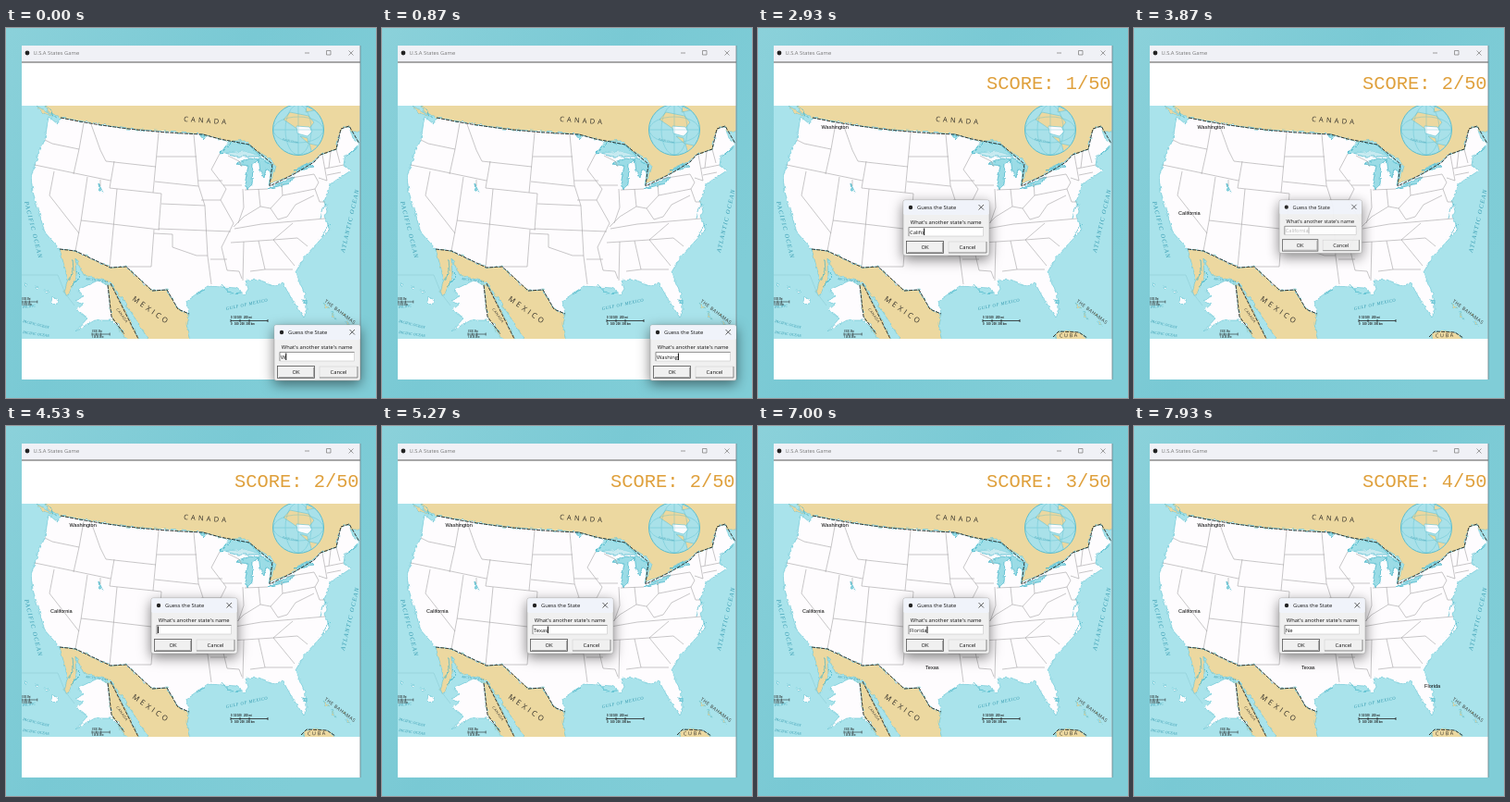
Write an HTML page that moves like this. It is 400 by 400 pixels and loops after 8000 ms.

```html
<!DOCTYPE html>
<html lang="en">
<head>
<meta charset="utf-8">
<title>States game</title>
<style>
  html, body { margin: 0; width: 100%; height: 100%; overflow: hidden; background: #7fccd6; }
  svg { display: block; width: 100vw; height: 100vh; }
  text { white-space: pre; }
  .ui { font: 5.8px "Open Sans", "Noto Sans", sans-serif; fill: #111; }
  .land { fill: #ecd8a0; stroke: #5cbfd0; stroke-width: .5; }
  .white { fill: #fefcfe; stroke: #62c3d2; stroke-width: .6; stroke-linejoin: round; }
  .lake { fill: #9bdce6; stroke: #42b3c7; stroke-width: .7; stroke-linejoin: round; }
  .borders { fill: none; stroke: #a3a1a3; stroke-width: .6; stroke-linejoin: round; }
  .frontier { fill: none; stroke: #282622; stroke-width: .9; stroke-dasharray: 4 1.2; }
  .coast { fill: none; stroke: #44b5c8; stroke-width: .7; }
  .country { font-family: "Open Sans", sans-serif; fill: #33302a; }
  .sea { font-family: "Liberation Serif", serif; font-style: italic; fill: #3198ae; }
  .scale { font: bold 2.8px "Liberation Sans", sans-serif; fill: #222; }
  #labels { font: 5.6px "Liberation Sans", Arial, sans-serif; }
  #score { font: 20.4px "Liberation Mono", "Courier New", monospace; fill: #dfa03c; }
  #dialog { filter: drop-shadow(0 4px 7px rgba(0, 0, 0, .5)); }
</style>
</head>
<body>
<svg viewBox="0 0 400 400">
  <defs>
    <linearGradient id="desk" x2="1" y2=".6">
      <stop stop-color="#8bd1da"/><stop offset=".5" stop-color="#79c9d4"/><stop offset="1" stop-color="#80cdd7"/>
    </linearGradient>
    <clipPath id="mapArea"><rect x="17" y="84" width="365.5" height="252"/></clipPath>
    <clipPath id="globeArea"><circle cx="316" cy="110" r="27"/></clipPath>
    <!-- Roughens the simplified coastlines -->
    <filter id="rough" color-interpolation-filters="sRGB" x="0" y="0" width="1" height="1">
      <feTurbulence type="fractalNoise" baseFrequency=".2" numOctaves="2" seed="4"/>
      <feDisplacementMap in="SourceGraphic" scale="4" xChannelSelector="R" yChannelSelector="G"/>
    </filter>
    <g id="ruler">
      <path d="M0 0H40M0-1.5v3m10-3v3m10-3v3m20-3v3" stroke="#222" stroke-width=".8"/>
      <text class="scale" y="-2.3">0  50 100   200 mi</text>
      <text class="scale" y="4.4">0   100  200  300 km</text>
    </g>
  </defs>

  <rect width="400" height="400" fill="url(#desk)"/>
  <rect x="17" y="19" width="366" height="361" fill="#fff"/>
  <rect x="17" y="19" width="366" height="17.5" fill="#f0f1f6"/>
  <path d="M17 37H383" stroke="#555" stroke-width="1.2"/>
  <circle cx="23" cy="27" r="2.4" fill="#222"/>
  <text class="ui" x="29.5" y="29.2" style="fill:#777">U.S.A States Game</text>
  <path d="M323 27h5M346.5 24.5h4.5v4.5h-4.5zM370.5 24.5l5 5m0-5l-5 5" fill="none" stroke="#777" stroke-width=".7"/>

  <g clip-path="url(#mapArea)">
    <rect x="17" y="84" width="366" height="252" fill="#a9e3eb"/>

    <g filter="url(#rough)">
      <rect x="10" y="75" width="380" height="270" fill="#a9e3eb"/>
      <!-- Canada and Mexico -->
      <path class="land" d="M39 80L45 90 59 97 130 109 213 115 240 123 258 121 270 132 285 141 291 149 285 170 313 158 315 151 334 144 341 137 356 132 363 109 376 112 390 112V78Z"/>
      <path class="land" d="M33 84L48 93 54 97 39 91Z"/>
      <path class="land" d="M58 239L75 241 113 259 130 258 158 284 174 283 186 304 198 309 195 320 199 340H156L132 302 113 275 84 267 75 249 76 270 66 291 63 285 67 272Z"/>
      <!-- Contiguous states -->
      <path class="white" d="M46 96L56 104 59 97 130 109 213 115 231 120 241 123 231 136 258 133 278 139 286 156 284 170 313 157 333 145 340 137 357 131 362 109 371 106 375 119 382 125 366 141 365 149 373 154 350 169 344 188 347 198 344 203 350 218 323 247 313 264 324 291 325 304 322 313 309 293 299 275 291 279 273 272 259 273 262 282 258 288 249 281 218 279 195 295 198 309 186 304 174 283 158 284 130 258 113 259 75 241 58 239 42 221 29 177 27 161 35 136 42 121Z"/>
      <!-- Great Lakes and smaller water -->
      <path class="lake" d="M232 135L245 122 263 127 276 139 249 139Z" fill-opacity=".55"/>
      <path class="lake" d="M249 147L264 141 273 143 267 147 266 169 261 175 258 169 262 149Z"/>
      <path class="lake" d="M273 140L289 149 287 156 281 152 279 162 275 156Z"/>
      <path class="lake" d="M282 174L291 170 312 160 307 168ZM311 154L328 147 332 150Z"/>
      <path class="lake" d="M100 168l5 10-4-3zM209 115l7 1-2 5zM321 293l4 1v4l-4-1z"/>
      <path class="coast" d="M42 84l6 3 3 9M347 190l-4 5-3 11m10 5l-9 15M365 140l7-5 9-7M205 287l10-4m18-6l9 10 12-1"/>
      <path class="coast" d="M72 249l1 13-5 11M76 263l5 5-11 11"/>
      <!-- Alaska and Hawaii -->
      <path class="land" d="M108 276L116 280 146 340H133L113 313Z"/>
      <path class="white" d="M78 283L99 273 110 278 114 312 128 330 114 316 96 316 76 327 88 314 76 305 83 299 75 294 84 290Z"/>
      <path class="white" d="M20 276l3 1-2 2zM31 279l4 1-3 2zM41 284l5 1-3 2zM50 291l7 4-4 5-4-4z"/>
      <!-- Caribbean -->
      <path class="land" d="M319 340L324 329 336 327 347 329 360 340ZM343 297l8 6-5-1zM352 306l5 9-4-3zM364 307l4 5-3-1zM368 317l5 4-5-1z"/>
    </g>

    <!-- State lines, west to east -->
    <path class="borders" d="M42 121L50 125 79 131M84 103L79 131 73 158M31 148L113 165M52 155L47 181 79 222M88 161L81 209 75 241M92 104L102 132 108 144 162 150M117 144L112 173 159 178M165 113L159 178M102 164v7M120 174L112 259M81 208L166 218"/>
    <path class="borders" d="M163 139H206M203 115L208 170 215 192 218 247 222 277M161 166L208 171M159 178L168 179 165 218M168 190L215 192M165 217L243 220M160 218L157 258H130M160 222L180 223V237L206 246H218"/>
    <path class="borders" d="M208 165H234M211 186H232M231 136L222 153 238 174 232 186 246 211 233 237 239 262 252 263 255 271M221 250H239M235 170H255M240 138L252 144 255 150M256 174L257 194 251 211M258 175L283 174M273 174L275 193"/>
    <path class="borders" d="M246 215L257 204 275 193 286 195 299 181M247 217L276 212 345 206M243 232L289 229 315 227 326 236M257 231L256 273M273 230L280 261H310M264 263L280 261M289 229L312 257M289 229L310 211"/>
    <path class="borders" d="M298 168L299 181 334 174 338 167 333 158 302 163M286 195L294 207 304 204 313 191 333 181M334 174L339 188H345M338 162L347 165 342 137M345 152L365 148M351 134L349 151M357 131L361 146M347 159L362 156"/>
    <path class="frontier" d="M59 97Q130 112 213 115L231 120 263 126 288 147 285 171 313 157 333 145 340 137 357 131 362 109 371 106 382 125"/>
    <path class="frontier" d="M58 239L75 241 113 259 130 258 158 284 174 283 186 304 198 309"/>
    <path class="frontier" d="M110 278L114 312 128 331M113 276L143 336M319 334l6-6 22 1 9 6" stroke-width=".6"/>
    <path class="borders" d="M17 267H56L64 287 74 300" style="stroke:#8dcbd6"/>

    <!-- Globe -->
    <circle cx="316" cy="110" r="27.5" fill="#a9e1e9" stroke="#5abccd"/>
    <g clip-path="url(#globeArea)">
      <path class="land" d="M300 99L307 91 327 95 333 102 323 115 309 105ZM318 117l8 2 1 6zM325 85l8 4-9 2zM328 125l9 2-6 9z"/>
      <path class="white" d="M314 106L328 107 331 112 326 117 315 114Z"/>
      <g class="coast" opacity=".45">
        <path d="M289 110h54M316 83v54"/>
        <ellipse cx="316" cy="110" rx="14" ry="27"/>
        <ellipse cx="316" cy="110" rx="27" ry="14"/>
      </g>
    </g>
    <text class="sea" font-size="3" transform="translate(299 121) rotate(12)">Pacific Ocean</text>

    <text class="country" font-size="7.6" letter-spacing="3.1" transform="translate(192 101) rotate(4)">CANADA</text>
    <text class="country" font-size="8" letter-spacing="3" transform="translate(136 294) rotate(35)">MEXICO</text>
    <text class="country" font-size="3.8" letter-spacing=".6" transform="translate(119 304) rotate(54)">CANADA</text>
    <text class="country" font-size="5" letter-spacing=".6" transform="translate(344 296) rotate(37)">THE BAHAMAS</text>
    <text class="country" font-size="5.5" letter-spacing="1.6" transform="translate(326 334.5) rotate(-2)">CUBA</text>
    <text class="sea" font-size="6.5" letter-spacing="1.3" transform="translate(20 188) rotate(76)">PACIFIC OCEAN</text>
    <text class="sea" font-size="6.5" letter-spacing="1.3" transform="translate(366 243) rotate(-77)">ATLANTIC OCEAN</text>
    <text class="sea" font-size="4.8" letter-spacing=".5" transform="translate(238 305) rotate(-12)">GULF OF MEXICO</text>
    <text class="sea" font-size="3.5" transform="translate(86 272) rotate(8)">ARCTIC OCEAN</text>
    <text class="sea" font-size="3.8" transform="translate(18 303) rotate(-7)">PACIFIC</text>
    <text class="sea" font-size="4" transform="translate(18 318) rotate(14)">PACIFIC OCEAN</text>
    <text class="sea" font-size="4" transform="translate(18 330) rotate(8)">PACIFIC OCEAN</text>
    <use href="#ruler" x="243" y="316.5"/>
    <use href="#ruler" transform="translate(93 331) scale(.48 1)"/>
    <use href="#ruler" transform="translate(17 296) scale(.42 1)"/>
  </g>
  <path d="M383 19V380" stroke="#697d83" stroke-width=".8"/>

  <g id="labels"></g>
  <text id="score" x="247" y="66"></text>

  <g id="dialog">
    <rect width="93" height="60" rx="2" fill="#f0f0f0" stroke="#999" stroke-width=".5"/>
    <rect x=".3" y=".3" width="92.4" height="15.7" rx="1.7" fill="#f0f3fa"/>
    <circle cx="8" cy="8" r="2.2" fill="#222"/>
    <text class="ui" x="15" y="10.2">Guess the State</text>
    <path d="M81.5 5l5.5 5.5m0-5.5l-5.5 5.5" stroke="#222" stroke-width=".7"/>
    <text class="ui" x="7.8" y="26">What's another state's name</text>
    <rect x="6" y="29.5" width="80.5" height="9.5" fill="#fff" stroke="#bbb" stroke-width=".5"/>
    <path d="M6 39V29.5H86.5" fill="none" stroke="#777" stroke-width=".7"/>
    <text id="entry" class="ui" x="7" y="36.5"></text>
    <path id="caret" d="M0 30.5V38" stroke="#000"/>
    <rect x="3.5" y="44.5" width="40" height="13" fill="#f0f0f0" stroke="#555" stroke-width=".8"/>
    <path d="M5 56.5H42.5V46" fill="none" stroke="#999" stroke-width=".8"/>
    <rect x="49" y="45" width="41" height="12" fill="#f0f0f0" stroke="#ccc" stroke-width=".5"/>
    <path d="M49 57H90V45" fill="none" stroke="#777" stroke-width=".8"/>
    <text class="ui" x="23.5" y="53" text-anchor="middle">OK</text>
    <text class="ui" x="69.5" y="53" text-anchor="middle">Cancel</text>
  </g>
</svg>
<script>
const LOOP = 8000, FADE = 150;
const rounds = [
  { name: "Washington", label: [68.5, 109], pos: [290, 321], open: -300, type: 0, step: 140, submit: 1450 },
  { name: "California", label: [48, 202], open: 1620, type: 2150, step: 150, submit: 3820 },
  { name: "Texas", label: [181, 262.5], open: 4020, type: 4600, step: 150, submit: 5480 },
  { name: "Florida", label: [314, 283], open: 5680, type: 6050, step: 150, submit: 7130 },
  { name: "Ne", open: 7300, type: 7700, step: 150, submit: Infinity },
];
const $ = id => document.getElementById(id);
const clamp = v => Math.max(0, Math.min(1, v));

for (const round of rounds.filter(r => r.label)) {
  const text = document.createElementNS("http://www.w3.org/2000/svg", "text");
  text.textContent = round.name;
  text.setAttribute("x", round.label[0]);
  text.setAttribute("y", round.label[1]);
  round.text = $("labels").appendChild(text);
}

function drawDialog(round, t) {
  const opening = clamp((t - round.open) / FADE);
  const closing = clamp((t - round.submit) / FADE);
  const [x, y] = round.pos || [157, 186];
  const scale = (0.92 + 0.08 * opening) * (1 - 0.12 * closing);
  const typed = Math.max(0, Math.floor((t - round.type) / round.step) + 1);
  const caretOn = (t - round.open) % 900 < 600;
  const entryOpacity = 1 - clamp(closing * 2);

  $("dialog").setAttribute("transform", `translate(${x + 3 * (1 - scale)} ${y}) scale(${scale})`);
  $("dialog").setAttribute("opacity", opening * (1 - closing ** 3));
  $("entry").textContent = round.name.slice(0, typed);
  $("entry").setAttribute("opacity", entryOpacity);
  const caretX = 7.4 + (typed ? $("entry").getComputedTextLength() : 0);
  $("caret").setAttribute("transform", `translate(${caretX} 0)`);
  $("caret").setAttribute("opacity", caretOn ? entryOpacity : 0);
}

function draw(now) {
  const t = now % LOOP;
  const solved = rounds.filter(r => t >= r.submit).length;
  for (const r of rounds) if (r.text) r.text.setAttribute("opacity", t >= r.submit ? 1 : 0);
  $("score").textContent = solved ? `SCORE: ${solved}/50` : "";
  drawDialog(rounds.filter(r => t >= r.open).pop(), t);
  requestAnimationFrame(draw);
}
draw(0);
</script>
</body>
</html>
```
